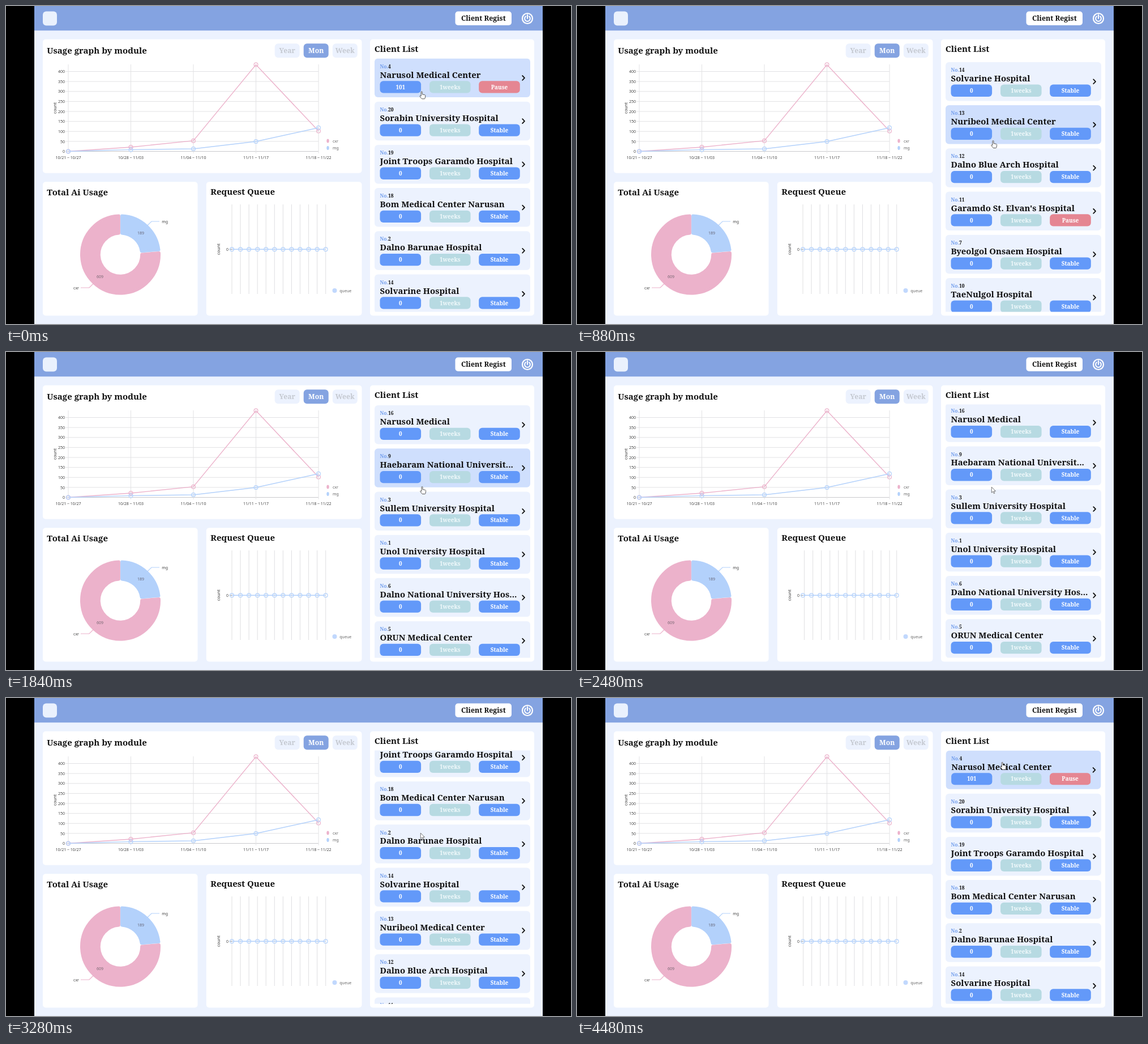
Animation, 998 px wide and 561 px high, one loop 4560 ms. Source, as an HTML page:

```html
<!DOCTYPE html>
<html lang="en">
<head>
<meta charset="utf-8">
<title>Client dashboard</title>
<style>
  html, body { margin: 0; width: 100%; height: 100%; overflow: hidden; background: #000; }
  svg { display: block; width: 100vw; height: 100vh; }
  .b { font-family: "Noto Serif", serif; font-weight: 700; }
  .s { font-family: "Noto Sans", "Open Sans", sans-serif; }
</style>
</head>
<body>
<svg id="stage" viewBox="0 0 998 561" xmlns="http://www.w3.org/2000/svg"></svg>
<script>
const LOOP = 4560, STEP = 80;
const PITCH = 76.2, TOP = 92.5, CARD_H = 68.5;
const PINK = '#ecb2cb', BLUE = '#b3d1fb', PALE = '#ecf2fe', HOVER = '#cfdffd';
const HEAD = '#84a3e1', GRID = '#e2e2e4', INK = '#111';

const clients = [
  [4, 'Narusol Medical Center'], [20, 'Sorabin University Hospital'],
  [19, 'Joint Troops Garamdo Hospital'], [18, 'Bom Medical Center Narusan'],
  [2, 'Dalno Barunae Hospital'], [14, 'Solvarine Hospital'],
  [13, 'Nuribeol Medical Center'], [12, 'Dalno Blue Arch Hospital'],
  [11, "Garamdo St. Elvan's Hospital"], [7, 'Byeolgol Onsaem Hospital'],
  [10, 'TaeNulgol Hospital'], [17, 'Dorweol University hospital'],
  [15, 'Dul Medical Center'], [16, 'Narusol Medical'],
  [9, 'Haebaram National Universit...'], [3, 'Sullem University Hospital'],
  [1, 'Unol University Hospital'], [6, 'Dalno National University Hos...'],
  [5, 'ORUN Medical Center']
];

// Markup helpers
const box = (x, y, w, h, r, fill, extra = '') =>
  `<rect x="${x}" y="${y}" width="${w}" height="${h}" rx="${r}" fill="${fill}" ${extra}/>`;
const text = (str, x, y, size, fill, cls = 'b', anchor = 'start', extra = '') =>
  `<text class="${cls}" x="${x}" y="${y}" font-size="${size}" fill="${fill}" text-anchor="${anchor}" ${extra}>${str}</text>`;
const title = (str, x, y) => text(str, x, y, 15, INK);
const path = (d, stroke, w = 1, extra = '') =>
  `<path d="${d}" fill="none" stroke="${stroke}" stroke-width="${w}" ${extra}/>`;
const ring = (x, y, color) =>
  `<circle cx="${x}" cy="${y}" r="3.4" fill="none" stroke="${color}" stroke-width="1.2"/>`;
const label = (str, x, y, anchor = 'start', size = 7, fill = '#444') =>
  text(str, x, y, size, fill, 's', anchor);
const upright = (str, x, y) =>
  text(str, x, y, 7.4, '#333', 's', 'middle', `transform="rotate(-90 ${x} ${y})"`);

function header() {
  return box(50, 0, 898, 561, 0, PALE) + box(50, 0, 898, 43.3, 0, HEAD) +
    box(65, 9.5, 25, 25, 6, '#eaf1fd') +
    box(793.5, 9.5, 99.5, 24.5, 5, '#fff') +
    text('Client Regist', 843.3, 26.3, 12.4, INK, 'b', 'middle') +
    `<circle cx="921" cy="22" r="9" fill="none" stroke="#fff" stroke-width="2.2"/>` +
    path('M918 18.2a4.9 4.9 0 1 0 6 0M921 15.5V22', '#fff', 2, 'stroke-linecap="round"');
}

function tab(str, x, active) {
  return box(x, 66.3, 44, 25, 6, active ? HEAD : PALE) +
    text(str, x + 22, 83.4, 12.2, active ? '#fff' : '#c5c9d1', 'b', 'middle');
}

function series(color, ys, xAt) {
  const pts = ys.map((y, i) => [xAt(i), y]);
  return path('M' + pts.join('L'), color, 1.4) + pts.map(p => ring(p[0], p[1], color)).join('');
}

function usageChart() {
  const xAt = i => 110 + i * 110.5;
  const days = ['10/21 ~ 10/27', '10/28 ~ 11/03', '11/04 ~ 11/10', '11/11 ~ 11/17', '11/18 ~ 11/22'];
  let out = box(65, 58.8, 563.5, 236, 5, '#fff') +
    title('Usage graph by module', 72.3, 84.2) +
    tab('Year', 474.7) + tab('Mon', 525.7, true) + tab('Week', 576.8);
  for (let i = 0; i <= 8; i++) {
    const y = 256.5 - i * 17.62;
    out += path(`M105.5 ${y}H552`, i ? GRID : '#c9c9cc') + label(i * 50, 104, y + 2.7, 'end');
  }
  days.forEach((d, i) => {
    out += path(`M${xAt(i)} 103V260`, GRID) + label(d, xAt(i), 270.3, 'middle');
  });
  out += upright('count', 88.5, 180) +
    series(PINK, [256.5, 249, 237.7, 103.6, 220.6], xAt) +
    series(BLUE, [256.5, 253.4, 252, 239, 214.8], xAt);
  [['cxr', 238, PINK], ['mg', 250.5, BLUE]].forEach(([n, y, c]) => {
    out += `<ellipse cx="568.5" cy="${y}" rx="2.2" ry="3.4" fill="${c}"/>` +
      label(n, 577, y + 2.7, 'start', 7, '#666');
  });
  return out;
}

// Ring slice with softened corners: inset outline plus a round-joined stroke
function slice(a0, a1, color) {
  const cx = 202, cy = 438.5, soft = 2.5, gap = soft + 0.1, R = 71 - soft, r = 35.2 + soft;
  const at = (rad, a) => `${cx + rad * Math.sin(a)} ${cy - rad * Math.cos(a)}`;
  const o = Math.asin(gap / R), n = Math.asin(gap / r), big = a1 - a0 > Math.PI ? 1 : 0;
  return `<path d="M${at(R, a0 + o)}A${R} ${R} 0 ${big} 1 ${at(R, a1 - o)}L${at(r, a1 - n)}` +
    `A${r} ${r} 0 ${big} 0 ${at(r, a0 + n)}Z" fill="${color}" stroke="${color}" ` +
    `stroke-width="${soft * 2}" stroke-linejoin="round"/>`;
}

function donut() {
  const full = Math.PI * 2, cut = full * 189 / 798;
  return box(65, 310.3, 273.5, 236, 5, '#fff') + title('Total Ai Usage', 72.3, 333.7) +
    slice(0, cut, BLUE) + slice(cut, full, PINK) +
    path('M250 387L257 380H271', BLUE, 1.2) + path('M154 490L147 497H132', PINK, 1.2) +
    label('mg', 275.3, 382.5) + label('cxr', 129, 499.7, 'end') +
    label('189', 238, 403.2, 'middle', 7, '#667') + label('609', 166, 480.2, 'middle', 7, '#756470');
}

const queueX = i => 399 + i * 15.06;
function queueChart() {
  const flat = Array(12).fill(429.3);
  return box(353.8, 310.3, 274.7, 236, 5, '#fff') + title('Request Queue', 361.3, 333.2) +
    path('', GRID, 1.1, 'id="ticks"') + path('M394.5 429.3H399', '#999') +
    label('0', 393, 432, 'end') + upright('count', 377.6, 429) +
    series(BLUE, flat, queueX) +
    `<circle cx="580.5" cy="502" r="4" fill="#c1d8fd"/>` + label('queue', 589.3, 504.7, 'start', 7, '#666');
}

function pill(str, x, color, ink = '#fff') {
  return box(x, 39.7, 72.6, 21.3, 6, color) + text(str, x + 36.3, 54, 10, ink, 'b', 'middle');
}

function card([no, name], i) {
  const paused = no === 4 || no === 11;
  return `<g class="card">` + box(651, 0, 275, CARD_H, 6, PALE) +
    `<text class="b" x="660.5" y="17.2" font-size="8.5" fill="#6f9cec">No.<tspan fill="${INK}">${no}</tspan></text>` +
    text(name, 660.5, 34.1, 14.9, INK) +
    pill(i ? 0 : 101, 660.5, '#6399f9') + pill('1weeks', 748, '#b7dae2', '#f1f9fb') +
    pill(paused ? 'Pause' : 'Stable', 835.2, paused ? '#e58692' : '#6399f9') +
    path('M912.2 30.5L916 34.4L912.2 38.3', '#111', 1.8, 'stroke-linecap="round" stroke-linejoin="round"') + '</g>';
}

const stage = document.getElementById('stage');
stage.innerHTML = header() + usageChart() + donut() + queueChart() +
  box(643, 58.8, 290, 487.5, 5, '#fff') + title('Client List', 650.8, 81.2) +
  `<clipPath id="view"><rect x="643" y="${TOP}" width="290" height="447"/></clipPath>` +
  `<g clip-path="url(#view)">${clients.map(card).join('')}</g>` +
  `<g id="hand"><path d="M0 1C0-.3 2-.3 2 1v4l4.4 .9c1 .2 1.3 1 1.2 2l-.6 3.8c-.1.8-.5 1.3-1.2 1.3H2c-.8 0-1.2-.3-1.7-1L-2 8.8c-.7-1 .5-1.8 1.3-1.2L0 8.3z" fill="#fff" stroke="#444" stroke-width=".9"/></g>` +
  `<g id="arrow"><path d="M0 0v10l2.4-2.2 1.6 3.7 1.6-.7-1.6-3.6h3.2z" fill="#fff" stroke="#555" stroke-width=".8"/></g>`;

const cards = [...stage.querySelectorAll('.card')];
const [ticks, hand, arrow] = ['ticks', 'hand', 'arrow'].map(id => document.getElementById(id));

// Motion tables: [ms, value, smooth]
const scrollKeys = [[400, 0], [880, 374.6, 1], [960, 374.6], [1440, 749.5, 1], [1520, 749.5],
  [1900, 992.9, 1], [2500, 992.9], [2960, 521.9], [3440, 0]];
const xKeys = [[80, 731.5], [360, 732.3, 1], [3680, 732.3], [4240, 748.5, 1]];
const yKeys = [[80, 151.5], [360, 238.2, 1], [3680, 238.2], [4240, 114, 1]];
const pressKeys = [[4240, 1], [4400, 0.995, 1]];
const queueStarts = [350, 1348, 2345, 3330, 4280];

const smooth = p => p < 0.5 ? 4 * p ** 3 : 1 - 4 * (1 - p) ** 3;
function sample(keys, t) {
  const k = keys.findIndex(row => row[0] > t);
  if (k === 0) return keys[0][1];
  if (k < 0) return keys[keys.length - 1][1];
  const [t0, v0] = keys[k - 1], [t1, v1, soft] = keys[k];
  const p = (t - t0) / (t1 - t0);
  return v0 + (v1 - v0) * (soft ? smooth(p) : p);
}

function queueShift(t) {
  const start = queueStarts.filter(s => s <= t).pop();
  if (start === undefined) return 0;
  return 15.06 * Math.max(0, 1 - (t - start) / 300) ** 3;
}

function draw(t) {
  const scroll = sample(scrollKeys, t), x = sample(xKeys, t), y = sample(yKeys, t);
  // Hover state trails the scroll slightly
  const under = y - TOP + sample(scrollKeys, t - 50);
  const over = under % PITCH < CARD_H ? Math.floor(under / PITCH) : -1;
  const press = sample(pressKeys, t);

  cards.forEach((g, i) => {
    const s = i ? 1 : press, top = TOP + i * PITCH - scroll;
    g.setAttribute('transform',
      `translate(${788.5 * (1 - s)} ${top + CARD_H / 2 * (1 - s)}) scale(${s})`);
    g.firstChild.setAttribute('fill', i === over ? HOVER : PALE);
  });

  hand.setAttribute('transform', `translate(${x + 1.7} ${y - 0.7})`);
  arrow.setAttribute('transform', `translate(${x} ${y})`);
  hand.style.display = over < 0 ? 'none' : '';
  arrow.style.display = over < 0 ? '' : 'none';

  const shift = queueShift(t);
  ticks.setAttribute('d', Array.from({ length: 12 }, (_, i) =>
    `M${Math.min(queueX(i) + shift, queueX(11))} 350V508`).join(''));
}

function frame() {
  const t = performance.now() % LOOP;
  draw(Math.floor(t / STEP) * STEP);
  requestAnimationFrame(frame);
}
frame();
</script>
</body>
</html>
```
